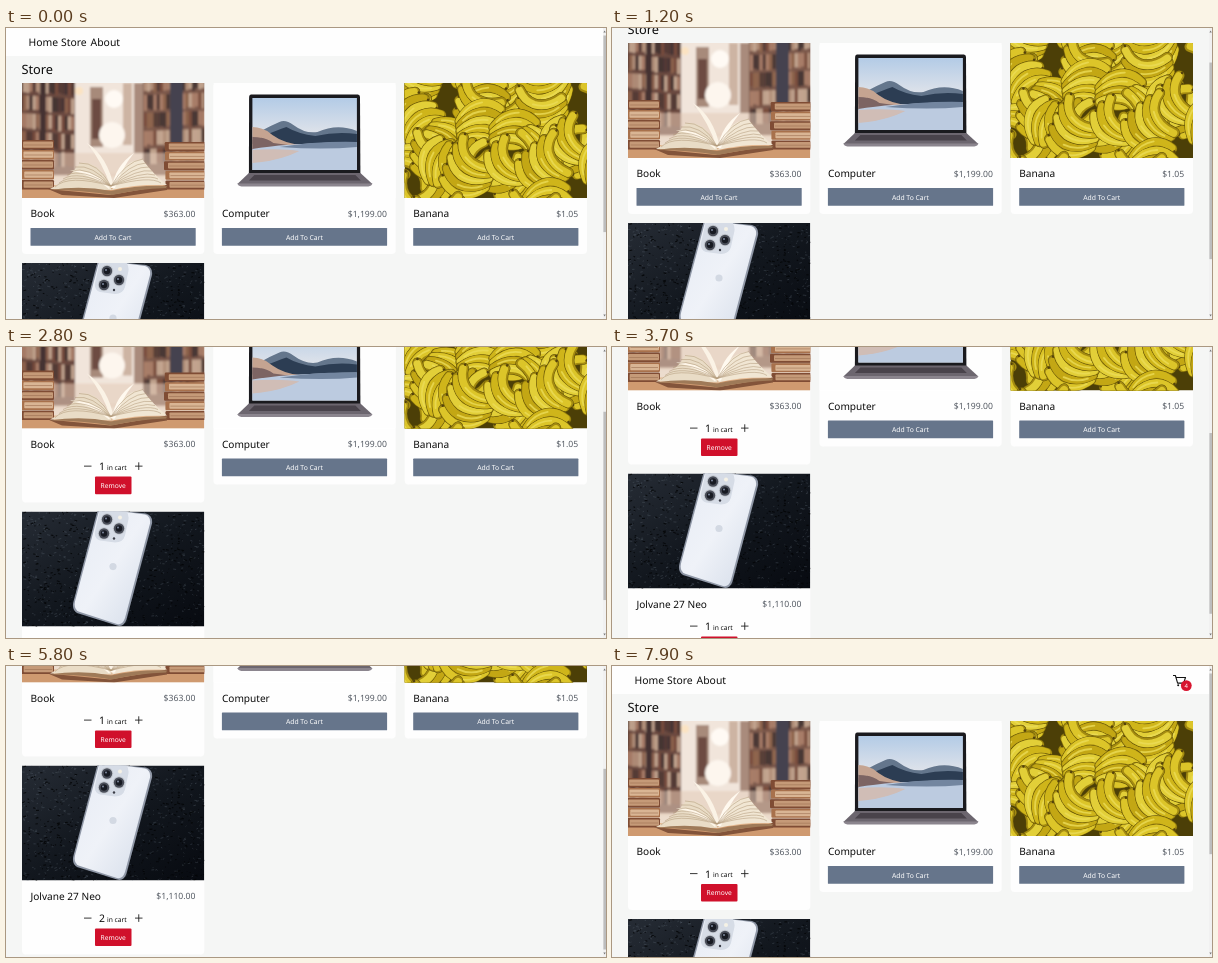
Recreate the animation shown at these times as an HTML page. Size 600x291 px, loop 8 s.

```html
<!DOCTYPE html>
<html lang="en">
<head>
<meta charset="utf-8">
<title>Store</title>
<style>
  html, body { margin: 0; width: 100%; height: 100%; overflow: hidden; background: #f5f6f5; }
  svg { display: block; }
  text { font-family: "Noto Sans", "Open Sans", sans-serif; font-weight: 500; fill: #0c0c0c; text-rendering: geometricPrecision; }
  .mid { text-anchor: middle; }
  .end { text-anchor: end; fill: #555b64; }
  .light { fill: #fff; }
</style>
</head>
<body>
<svg id="stage" width="100%" height="100%" viewBox="0 0 600 291"></svg>
<script>
const LOOP = 8000, VIEW = 291;
const W = 182.3, H = 115;
const stage = document.getElementById('stage');

function seeded(seed) {
  return () => (seed = (seed * 16807) % 2147483647) / 2147483647;
}
const rect = (x, y, w, h, fill, extra = '') =>
  `<rect x="${x}" y="${y}" width="${w}" height="${h}" fill="${fill}" ${extra}/>`;
const path = (d, fill, extra = '') => `<path d="${d}" fill="${fill}" ${extra}/>`;
const line = (d, stroke, width, extra = '') =>
  `<path d="${d}" fill="none" stroke="${stroke}" stroke-width="${width}" ${extra}/>`;
const circle = (x, y, r, fill, extra = '') =>
  `<circle cx="${x}" cy="${y}" r="${r}" fill="${fill}" ${extra}/>`;
const text = (x, y, size, str, cls = '', extra = '') =>
  `<text x="${x}" y="${y}" font-size="${size}" class="${cls}" ${extra}>${str}</text>`;

function bookArt() {
  const rnd = seeded(71);
  const spines = ['#7b4d3c', '#b58870', '#4d3733', '#d6b9a2', '#96694f', '#3b2e30', '#c4a088'];
  const pick = () => spines[Math.floor(rnd() * spines.length)];
  let shelves = '';
  const shelf = (from, to, tilt) => {
    for (let row = 0; row < 5; row++) {
      for (let x = from; x < to; x += 3.2) {
        shelves += rect(x, row * 18 - 6 + (x - from) * tilt, 2.9, 13 + rnd() * 3, pick(), 'opacity=".85"');
      }
    }
  };
  shelf(-2, 52, 0.07);
  shelf(122, 184, -0.04);
  let stacks = '';
  const stack = (x, y, w, n, h) => {
    for (let i = 0; i < n; i++) {
      const dx = rnd() * 4;
      stacks += rect(x + dx, y + i * h, w - dx, h - 0.6, i % 2 ? '#a8714c' : '#7f4c34', 'rx="1.2"')
        + rect(x + dx + 4, y + i * h + 1.6, w - dx - 5, h - 3.8, i % 2 ? '#d9b594' : '#c59a78', 'rx=".8"')
        + line(`M${x + dx + 5} ${y + (i + 0.5) * h} h${w - dx - 7}`, '#9c7152', 0.6);
    }
  };
  stack(-4, 57, 36, 5, 10);
  stack(142, 59, 44, 5, 9.6);
  let pages = '';
  for (let i = 0; i < 7; i++) {
    pages += line(`M89 103 Q${76 - i * 5} ${79 + i * 2} ${57 - i * 4} ${80 + i * 4}`, '#b39a7c', 0.55)
      + line(`M89 103 Q${104 + i * 4} ${78 + i * 2.4} ${121 + i * 3} ${76 + i * 4}`, '#b39a7c', 0.55);
  }
  return rect(0, 0, W, H, '#ecdccd')
    + `<g filter="url(#soft)">${rect(-4, -4, 57, 96, '#6b4a40')}${rect(121, -4, 66, 96, '#7b594c')}${shelves}
      ${rect(53, -4, 68, 94, '#f1e5db')}${rect(68, 4, 13, 60, '#a78a7a')}${rect(70, 16, 9, 40, '#6d4b42')}
      ${rect(101, 0, 9, 62, '#cdb4a3')}${rect(112, 0, 9, 70, '#a98b7b')}
      ${rect(148, -4, 13, 72, '#454250')}${rect(18, -4, 6, 72, '#443331')}
      ${rect(-4, 70, 190, 24, '#e3cdbb', 'opacity=".55"')}
      ${circle(92, 16, 9, '#fffaf4')}${circle(90, 52, 13, '#fdf6ee')}${circle(57, 8, 4, '#fbe3c2')}</g>`
    + rect(0, 103, W, 12, '#cf9a70') + rect(0, 102, W, 3, '#e3b78f')
    + stacks
    + path('M26 106 L88 112 L146 102 L145 107 L92 115 L40 112Z', '#83543a')
    + path('M28 106 Q46 97 58 80 Q78 77 90 107 Z', '#e9dcc6')
    + path('M90 107 Q97 79 120 76 Q132 92 145 102 Q115 101 90 107Z', '#f1e6d3')
    + path('M89 105 Q81 80 65 60 Q86 74 92 105Z', '#fbf3e6')
    + path('M90 105 Q93 83 112 70 Q99 86 93 105Z', '#fff9ef')
    + path('M88 105 Q73 86 48 87 Q73 93 87 106Z', '#fff7ea')
    + pages + path('M28 107 Q60 102 89 108 Q116 102 145 103 L144 105 Q116 106 90 112 Q60 107 28 107Z', '#9f7a58');
}

function laptopArt() {
  return rect(0, 0, W, H, '#fefefe')
    + path('M37.5 11.5 H144.5 Q146.5 11.5 146.6 14 L147 92 H35.5 L35.7 14 Q35.8 11.5 37.5 11.5Z', '#1a1a1e')
    + rect(39, 15, 104.5, 72, 'url(#sky)')
    + path('M39 53 Q54 44 66 39 Q72 36 80 42 Q92 51 104 49 Q124 40 143.5 48 V60 H39Z', '#64768c')
    + path('M39 57 Q62 48 73 44 Q85 51 102 53 Q124 48 143.5 51 V60 Q100 62 39 61Z', '#2c3d53')
    + path('M39 44 Q50 44 59 52 Q70 60 88 62 Q66 67 39 67Z', '#c5a491')
    + path('M39 54 Q52 54 60 60 L82 63 Q60 67 39 67Z', '#7c6463')
    + path('M39 66 Q74 60 143.5 59 V87 H39Z', '#bccbe0')
    + path('M66 64 Q104 58 143.5 59 V64 Q110 67 66 64Z', '#7386a0')
    + path('M39 67 Q68 65 86 68 Q66 78 39 80Z', '#d0bdb6')
    + path('M35.5 90 H147 L159 101 H24Z', '#6c666f')
    + path('M41 92 H142 L147.5 97.5 H35.5Z', '#49434b')
    + path('M24 100.5 H159 Q158.5 103 155 103.4 H28 Q24.5 103 24 100.5Z', '#8b858e');
}

function bananaArt() {
  const rnd = seeded(4242);
  const skins = ['#cfb51a', '#dcc529', '#c3a714', '#e2cf38'];
  const shape = 'M0 0 Q13 -11 27 -8 Q37 -5 42 5';
  const round = 'stroke-linecap="round"';
  let out = rect(0, 0, W, H, '#4c3f07');
  const bunch = (x, y, turn, n) => {
    let g = '';
    for (let i = 0; i < n; i++) {
      const k = i - (n - 1) / 2;
      g += `<g transform="translate(0 ${k * 5}) rotate(${k * 9})">`
        + line(shape, '#5f5007', 10.6, round)
        + line(shape, '#a48b10', 9.6, round)
        + `<g transform="translate(0 -1)">${line(shape, skins[(i + n) % 4], 7.4, round)}</g>`
        + line('M4 -5 Q15 -12 28 -9', '#ebdc58', 1.8, round + ' opacity=".8"')
        + circle(43, 8.6, 1.3, '#54420c') + '</g>';
    }
    out += `<g transform="translate(${x.toFixed(1)} ${y.toFixed(1)}) rotate(${turn.toFixed(0)})">${g}</g>`;
  };
  for (let row = 0; row < 6; row++) {
    for (let col = 0; col < 7; col++) {
      bunch(col * 32 - 12 + rnd() * 12, row * 25 - 6 + rnd() * 10, rnd() * 360, 3 + Math.floor(rnd() * 3));
    }
  }
  return out;
}

function phoneArt() {
  const rnd = seeded(909);
  let grain = '', pits = '';
  for (let i = 0; i < 1100; i++) {
    const x = rnd() * W, y = rnd() * H;
    const d = `M${x.toFixed(1)} ${y.toFixed(1)}l${(rnd() * 3).toFixed(1)} ${(rnd() * 2 - 1).toFixed(1)}`;
    if (i % 2) grain += d; else pits += d;
  }
  const lens = (x, y) => circle(x, y, 6.2, '#c3c8d0') + circle(x, y, 5.2, '#4a4e59')
    + circle(x, y, 3.2, '#171a22') + circle(x - 1, y - 1, 1, '#7d879c');
  return rect(0, 0, W, H, 'url(#leather)')
    + line(grain, '#5b6572', 0.8, 'opacity=".45"') + line(pits, '#030406', 1.1, 'opacity=".8"')
    + path('M76 -3 L124 2 Q131 4 130 12 L104.5 108 Q102 116 95 114 L55 101.5 Q49.5 98 51.5 90Z', '#8f97a6')
    + path('M77.5 -3 L123 3 Q129 5 128 12 L103 106.5 Q100.5 114 95 112.5 L56.5 100 Q51.5 97 53 90Z', 'url(#silver)')
    + path('M78 -2 H103 Q108 3 106 10 L103 24 Q101 31 93 31 L78 29 Q72 27 73 20Z', '#d6dce6')
    + lens(85, 8) + lens(82, 22) + lens(97, 17)
    + circle(98, 6, 2, '#f6f2e6') + circle(92, 27, 1.2, '#3a3d46')
    + circle(91, 55, 3.6, '#d3d9e3');
}

function card(id, x, y, name, price, art) {
  return `<g id="${id}" transform="translate(${x} ${y})">
    ${rect(0, 0, W, 171, '#fefefe', 'rx="4" class="panel"')}
    <svg width="${W}" height="${H}" viewBox="0 0 ${W} ${H}">${art}</svg>
    ${text(8.5, 134.2, 10.1, name)}
    ${text(173.5, 133.8, 8.65, price, 'end')}
    <g class="add">${rect(8.5, 145, 165.2, 17.8, '#66758b', 'rx=".6"')}
      ${text(91, 156.5, 6.8, 'Add To Cart', 'mid light')}</g>
    <g class="pick">${line('M62 152.6 h7.5 M113 152.6 h7.5 M116.75 148.8 v7.6', '#222', 0.9)}
      ${text(80, 156.6, 10.4, '1', 'mid qty')}${text(85, 156.4, 6.7, 'in cart')}
      ${rect(73, 163, 36.5, 17.6, '#d0102b', 'rx="1"')}${text(91.2, 174.4, 6.7, 'Remove', 'mid light')}</g>
  </g>`;
}

stage.innerHTML = `<defs>
    <filter id="soft"><feGaussianBlur stdDeviation="1.2"/></filter>
    <linearGradient id="sky" x2="0" y2="1"><stop stop-color="#b3cbe6"/><stop offset=".5" stop-color="#dfe3ea"/></linearGradient>
    <linearGradient id="silver" x2="1" y2="1"><stop stop-color="#e6ebf4"/><stop offset=".5" stop-color="#eff2f8"/><stop offset="1" stop-color="#d3dbe8"/></linearGradient>
    <linearGradient id="leather" x2="1" y2="1"><stop stop-color="#262c35"/><stop offset=".5" stop-color="#12171e"/><stop offset="1" stop-color="#070a10"/></linearGradient>
  </defs>
  ${rect(0, 0, 600, VIEW, '#f5f6f5')}
  <g id="page">
    ${rect(0, 0, 600, 28, '#fefefe')}
    ${text(22.6, 17.6, 10.4, 'Home')}${text(55, 17.6, 10.4, 'Store')}${text(84.6, 17.6, 10.4, 'About')}
    <g id="cart">${line('M561 9.5 h2.4 l2.2 7.6 h6 l1.9 -5.6 h-9.4', '#111', 1.1, 'stroke-linejoin="round"')}
      ${circle(566.2, 19.2, 1, '#111')}${circle(571.4, 19.2, 1, '#111')}
      ${circle(574.3, 19.6, 5.4, '#d8152f')}${text(574.3, 21.8, 6, '', 'mid light', 'id="total"')}</g>
    ${text(15.4, 46.4, 12.8, 'Store')}
    ${card('phone', 16, 235, 'Jolvane 27 Neo', '$1,110.00', phoneArt())}
    ${card('book', 16, 55, 'Book', '$363.00', bookArt())}
    ${card('laptop', 207.4, 55, 'Computer', '$1,199.00', laptopArt())}
    ${card('banana', 398.7, 55, 'Banana', '$1.05', bananaArt())}
  </g>
  ${rect(597, 0, 3, VIEW, '#f1f1f1')}
  ${path('M597.4 4.5 L598.6 2.6 L599.8 4.5Z M597.4 286.5 L598.6 288.4 L599.8 286.5Z', '#777')}
  <rect id="thumb" x="597.4" width="2.6" fill="#bdbdbd"/>`;

const byId = id => document.getElementById(id);
const page = byId('page'), thumb = byId('thumb'), cart = byId('cart'), total = byId('total');

// start, end, scroll position reached
const moves = [
  [765, 1200, 40], [2565, 3000, 126.5], [4150, 4400, 55], [4400, 4600, 153.5], [7065, 7500, 0]
];
function scrollAt(t) {
  let pos = 0;
  for (const [start, end, to] of moves) {
    const p = Math.min(1, Math.max(0, (t - start) / (end - start)));
    pos += (to - pos) * p * p * (3 - 2 * p);
  }
  return pos;
}

const clicks = { book: [2100], phone: [3700, 5800, 6800] };
const countAt = (id, t) => (clicks[id] || []).filter(at => t >= at).length;

function setCard(id, n) {
  const el = byId(id), show = (cls, on) => el.querySelector(cls).setAttribute('display', on ? 'inline' : 'none');
  show('.add', !n);
  show('.pick', n);
  el.querySelector('.qty').textContent = n;
  el.querySelector('.panel').setAttribute('height', n ? 189 : 171);
}

function draw(time) {
  const t = Math.floor((time % LOOP) / 100) * 100;
  const books = countAt('book', t), phones = countAt('phone', t);
  ['book', 'laptop', 'banana', 'phone'].forEach(id => setCard(id, countAt(id, t)));
  byId('phone').setAttribute('transform', `translate(16 ${books ? 253 : 235})`);
  cart.setAttribute('display', books + phones ? 'inline' : 'none');
  total.textContent = books + phones;

  const pos = scrollAt(t);
  const full = 408.5 + (books ? 18 : 0) + (phones ? 18 : 0);
  page.setAttribute('transform', `translate(0 ${-pos.toFixed(2)})`);
  thumb.setAttribute('y', 7.5 + 276 * pos / full);
  thumb.setAttribute('height', 276 * VIEW / full);
}

const begin = performance.now();
function tick() {
  draw(performance.now() - begin);
  requestAnimationFrame(tick);
}
tick();
</script>
</body>
</html>
```
